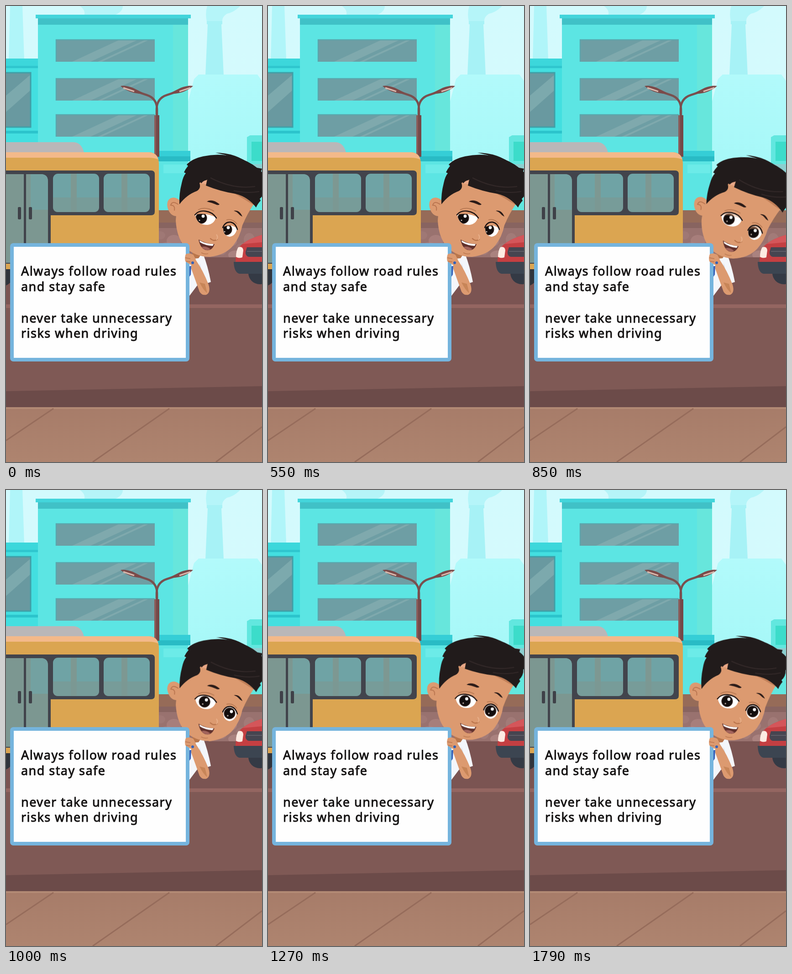
Write an HTML page that moves like this. It is 561 px wide and 998 px high and loops after 1.82 s.

```html
<!DOCTYPE html>
<html lang="en">
<head>
<meta charset="utf-8">
<title>Road safety</title>
<style>
  html, body { margin: 0; width: 100%; height: 100%; overflow: hidden; background: #d6fafc; }
  svg { display: block; width: 100vw; height: 100vh; }
  #head { transform-origin: 438px 535px; }
  .note { font: 500 27px "Noto Sans", "Open Sans", sans-serif; letter-spacing: 1.45px;
          fill: #151313; stroke: #151313; stroke-width: .9; stroke-linejoin: round; }
</style>
</head>
<body>
<svg viewBox="0 0 561 998" preserveAspectRatio="none">
  <defs>
    <linearGradient id="sky" x2="0" y2="1">
      <stop stop-color="#d3fafd"/><stop offset="1" stop-color="#dcfcfd"/>
    </linearGradient>
    <linearGradient id="haze" x2="0" y2="1">
      <stop stop-color="#b2fafb"/><stop offset="1" stop-color="#a0f7f6"/>
    </linearGradient>
    <linearGradient id="pave" x2="0" y2="1">
      <stop stop-color="#a77c69"/><stop offset="1" stop-color="#ae846f"/>
    </linearGradient>
    <g id="pane">
      <rect width="217" height="49" fill="#6e9ea4"/>
      <path d="M36 49L142 0H182L76 49ZM92 49L198 0H207L101 49Z" fill="#7fa9ad"/>
      <path d="M1 49V1H217" fill="none" stroke="#5aa6ac" stroke-width="2.5"/>
    </g>
    <g id="busPane">
      <rect width="101" height="84" rx="11" fill="#6fa3a5"/>
      <path d="M39 0H52V84H39Z" fill="#7d9892"/>
      <path d="M0 52H101V73Q101 84 90 84H11Q0 84 0 73Z" fill="#7b9994" opacity=".65"/>
    </g>
    <g id="lampArm" fill="none">
      <path d="M331 245V225Q330 202 309 195L288 188" stroke="#79504f" stroke-width="4.5"/>
      <path d="M251 175Q262 173 278 179L300 190L292 192Q268 190 251 175Z" fill="#7b4a49"/>
      <path d="M257 179L281 187" stroke="#d9b9ae" stroke-width="3"/>
    </g>
    <clipPath id="eyeL"><path id="eyeShapeL" d="M415 458Q421 447 437 449Q454 452 460 463Q456 477 442 479Q419 480 415 458Z"/></clipPath>
    <clipPath id="eyeR"><path id="eyeShapeR" d="M476 486Q480 472 492 473Q504 476 506 488Q503 503 490 505Q476 503 476 486Z"/></clipPath>
    <g id="iris">
      <circle r="12.5" fill="#2a1a16"/>
      <circle r="10.5" fill="#120d0d"/>
      <circle cx="4" cy="-4" r="3.4" fill="#fff"/>
      <circle cx="-4" cy="5" r="1.6" fill="#cbb9b1"/>
    </g>
  </defs>

  <!-- sky and far skyline -->
  <rect width="561" height="998" fill="url(#sky)"/>
  <path d="M9 0H36L40 120H6Z" fill="#b0f5f9"/>
  <path d="M162 0H256Q256 12 240 19H172Q174 8 162 0Z" fill="#b5f4f8"/>
  <path d="M441 0H513Q500 14 484 17Q473 24 474 34H440Q436 15 441 0Z" fill="#b5f5f9"/>
  <path d="M440 33H474V40H472L477 152H437L442 40H440Z" fill="#a7f2f6"/>
  <path d="M396 220L412 160L422 150H551L561 164V460H396Z" fill="url(#haze)"/>
  <path d="M528 287L535 283H561V460H520V346H528Z" fill="#62e7df"/>
  <path d="M538 297H561V339H538Z" fill="#3cdcca"/>
  <path d="M526 346H561V402H526Z" fill="#8ccfd0"/>

  <!-- left block -->
  <path d="M0 115H72V330H0Z" fill="#43dfe0"/>
  <path d="M0 115H72V131H0Z" fill="#3cd7db"/>
  <path d="M0 131H72V136H0Z" fill="#2fc6ce"/>
  <path d="M0 146H54V265H0Z" fill="#6999a0"/>
  <path d="M0 196L54 150V184L0 232Z" fill="#7ca9ad"/>
  <path d="M0 146H54V265H0" fill="none" stroke="#3fa0a8" stroke-width="3"/>
  <path d="M0 273H72V279H0Z" fill="#2cc4cc"/>

  <!-- main block -->
  <path d="M70 28H399V450H70Z" fill="#5ce5e3"/>
  <path d="M366 41H399V318H366Z" fill="#67e6dc"/>
  <path d="M70 27H399V41H70Z" fill="#40c1c7"/>
  <path d="M65 19H405V27H65Z" fill="#43d5db"/>
  <use href="#pane" x="109" y="73"/>
  <use href="#pane" x="109" y="158"/>
  <use href="#pane" x="109" y="237"/>
  <path d="M325 317H404V338H325Z" fill="#35ced6"/>
  <path d="M325 329H404V340H325Z" fill="#29bbc5"/>
  <path d="M345 347H395V366H345Z" fill="#6cebe8"/>

  <!-- street lamp -->
  <use href="#lampArm"/>
  <use href="#lampArm" transform="matrix(-1 0 0 1 661 0)"/>
  <path d="M325 239H336V330H325Z" fill="#744848"/>
  <path d="M325 239H329V330H325Z" fill="#8a5b59"/>

  <!-- wall and road -->
  <path d="M320 447H561V560H320Z" fill="#99726f"/>
  <path d="M320 447H561V474H320Z" fill="#966b58"/>
  <path d="M320 474H561V486H320Z" fill="#886460"/>
  <g id="stones" fill="#bb928f"></g>
  <rect y="550" width="561" height="105" fill="#7b5452"/>
  <rect y="653" width="561" height="8" fill="#946661"/>
  <rect y="661" width="561" height="182" fill="#7f5955"/>
  <path d="M0 843L561 832V880H0Z" fill="#6c4b49"/>
  <rect y="878" width="561" height="120" fill="url(#pave)"/>
  <rect y="878" width="561" height="4" fill="#b38a75"/>
  <path d="M104 881L0 951M358 881L190 998M561 921L460 998" fill="none" stroke="#966c5b" stroke-width="3"/>

  <!-- bus -->
  <circle cx="-8" cy="590" r="23" fill="#30343c"/>
  <path d="M0 298H148Q166 299 171 321H0Z" fill="#b9b7b8"/>
  <path d="M0 320H313Q335 321 335 345V576H0Z" fill="#dba551"/>
  <path d="M0 320H313Q330 321 334 336Q325 332 313 332H0Z" fill="#f3b98a"/>
  <path d="M0 360H318Q326 360 326 368V450Q326 458 318 458H98V564H0Z" fill="#42444c"/>
  <path d="M0 368H39V562H0Z" fill="#7c9791"/>
  <path d="M44 368H78Q92 369 92 384V562H44Z" fill="#7c9791"/>
  <path d="M44 368H78Q92 369 92 384V446H44Z" fill="#73a1a1"/>
  <path d="M44 368H54V446H44Z" fill="#7c9791"/>
  <rect x="26" y="440" width="7" height="27" rx="2" fill="#3f4148"/>
  <rect x="50" y="440" width="7" height="27" rx="2" fill="#3f4148"/>
  <use href="#busPane" x="103" y="367"/>
  <use href="#busPane" x="214" y="367"/>

  <!-- red car -->
  <circle cx="556" cy="584" r="25" fill="#343a45"/>
  <path d="M561 501Q535 508 518 521Q503 531 503 562H561Z" fill="#c43f42"/>
  <path d="M561 501Q535 508 518 521L561 517Z" fill="#d4565a"/>
  <path d="M509 528Q519 525 520 535L518 550Q511 553 504 549Q504 536 509 528Z" fill="#fdebe2"/>
  <path d="M528 528H561V549H532Q524 547 525 538Z" fill="#464550"/>
  <path d="M528 537H561" stroke="#5f5c66" stroke-width="2"/>
  <path d="M499 560H561V586H512Q500 584 499 560Z" fill="#3c4551"/>

  <!-- body -->
  <path d="M396 545L432 543Q442 568 449 604L434 609L424 605L400 637H390Z" fill="#f4f6fb"/>
  <path d="M424 562L437 608L427 606Z" fill="#d5dbe6"/>
  <path d="M398 570L406 569L405 588L399 597Z" fill="#3561b8"/>
  <path d="M408 540L430 540L422 552L412 553Z" fill="#b9764c"/>

  <g id="head">
    <path d="M381 426Q371 416 360 421Q351 427 354 441Q359 459 373 460Q383 462 385 450Z" fill="#dc9a70"/>
    <path d="M377 434Q364 425 361 436Q371 436 369 447" fill="none" stroke="#b97550" stroke-width="2" stroke-linecap="round"/>
    <path d="M386 405Q373 445 372 470Q374 506 392 527Q413 549 447 549Q481 545 498 524Q513 505 518 480Q529 454 544 432L525 395L435 365Z" fill="#dc9a70"/>
    <path d="M480 400Q512 416 530 428L544 436L548 420L520 390Z" fill="#c07f58"/>
    <path d="M380 434Q379 411 385 388Q388 373 394 366L390 364Q393 357 399 350L396 347Q408 334 432 329Q468 321 504 331Q530 338 550 354L561 356L559 362Q580 378 570 401L566 400Q566 414 556 422L558 426Q552 432 548 441Q531 418 503 411Q470 406 438 393L441 380Q432 385 428 388Q426 384 424 388Q428 399 418 405Q396 413 380 434Z" fill="#211b1b"/>
    <path d="M459 321Q503 321 536 347Q499 329 459 321Z" fill="#211b1b"/>
    <path d="M440 381Q431 382 427 390Q433 387 438 391Z" fill="#e8a888"/>
    <path d="M448 376Q498 402 546 395M499 404Q528 411 555 406" fill="none" stroke="#332929" stroke-width="2"/>

    <path d="M440 428Q452 421 468 434Q465 437 459 434Q449 430 440 428Z" fill="#2a1b18"/>
    <path d="M499 448Q512 446 518 461Q512 458 509 454Q505 450 499 448Z" fill="#2a1b18"/>

    <use href="#eyeShapeL" fill="#fff"/>
    <use href="#eyeShapeR" fill="#fff"/>
    <g clip-path="url(#eyeL)"><g class="gaze"><use href="#iris" x="435" y="463"/></g></g>
    <g clip-path="url(#eyeR)"><g class="gaze"><use href="#iris" x="490" y="488"/></g></g>
    <g class="lids" fill="#dc9a70">
      <path d="M413 457Q421 445 438 447Q455 450 462 464Q440 451 413 457Z"/>
      <path d="M474 485Q480 470 493 471Q505 474 508 489Q494 474 474 485Z"/>
    </g>
    <path d="M414 457Q422 447 437 449Q453 451 461 464M475 485Q480 472 492 473Q503 475 507 489" fill="none" stroke="#1d1312" stroke-width="2.4" stroke-linecap="round"/>
    <path d="M421 446Q437 438 456 449M483 468Q497 465 506 477" fill="none" stroke="#b57650" stroke-width="1.6"/>

    <path d="M448 509Q455 516 463 511" fill="none" stroke="#b8734a" stroke-width="2.4" stroke-linecap="round"/>
    <path d="M461 500Q466 506 461 512" fill="none" stroke="#e8b08a" stroke-width="2"/>
    <path d="M422 511Q438 521 457 521Q452 537 437 534Q425 529 422 511Z" fill="#61312c"/>
    <path d="M424 513Q438 521 455 521L453 525Q436 524 425 517Z" fill="#fff"/>
    <path d="M429 527Q438 525 448 532Q443 536 436 533Q432 532 429 527Z" fill="#a3645c"/>
    <path d="M428 540Q435 544 443 542" fill="none" stroke="#bd7a52" stroke-width="1.8"/>
  </g>

  <!-- arm, card, hand -->
  <path d="M406 554L416 556Q432 579 444 610Q449 627 439 632Q429 634 424 625L406 575Z" fill="#dc9a70"/>
  <path d="M424 605L436 608L441 628Q433 623 424 605Z" fill="#c78558"/>
  <rect x="13" y="523" width="385" height="251" rx="3" fill="#fefefe" stroke="#75b4dd" stroke-width="8"/>
  <path d="M394 543Q403 539 411 545L416 555L414 566Q406 569 401 564L393 559Q391 550 394 543Z" fill="#dc9a70"/>
  <path d="M393 551L404 553M395 559L404 560" stroke="#b97550" stroke-width="1.4"/>
  <circle cx="409" cy="562" r="3" fill="#3561b8"/>

  <g class="note">
    <text x="33" y="590">Always follow road rules</text>
    <text x="33" y="624">and stay safe</text>
    <text x="33" y="693">never take unnecessary</text>
    <text x="33" y="726">risks when driving</text>
  </g>
</svg>
<script>
  const LOOP = 1820;

  // Each row: time in ms, then the values for the pose.
  function play(selector, rows, style) {
    const frames = rows.map(([ms, ...v]) => ({ offset: ms / LOOP, easing: "ease-in-out", ...style(...v) }));
    for (const el of document.querySelectorAll(selector)) {
      el.animate(frames, { duration: LOOP, iterations: Infinity });
    }
  }

  // Rest, dip to the right, one swing across to the left, settle.
  play("#head", [
    [0, 0, 0, 0], [560, 0, 0, 0],
    [730, -1, 4, 5], [1220, 0, -2, -2.7],
    [1560, 0, -1, -2.4], [LOOP, 0, -1, -2.4]
  ], (x, y, turn) => ({ transform: `translate(${x}px, ${y}px) rotate(${turn}deg)` }));

  play(".gaze", [[0, -7, 1], [770, -7, 1], [920, 0, 0], [LOOP, 0, 0]],
    (x, y) => ({ transform: `translate(${x}px, ${y}px)` }));

  play(".lids", [[0, 1], [770, 1], [920, 0], [LOOP, 0]], opacity => ({ opacity }));

  // Soft rounded stones along the wall.
  const stones = document.getElementById("stones");
  for (let i = 0; i < 16; i++) {
    const stone = document.createElementNS("http://www.w3.org/2000/svg", "ellipse");
    const look = {
      cx: 338 + i * 15, cy: 502 + (i * 29) % 46,
      rx: 11 + (i * 7) % 9, ry: 9 + (i * 5) % 6, opacity: .2 + (i % 4) * .1
    };
    for (const key in look) stone.setAttribute(key, look[key]);
    stones.append(stone);
  }
</script>
</body>
</html>
```
